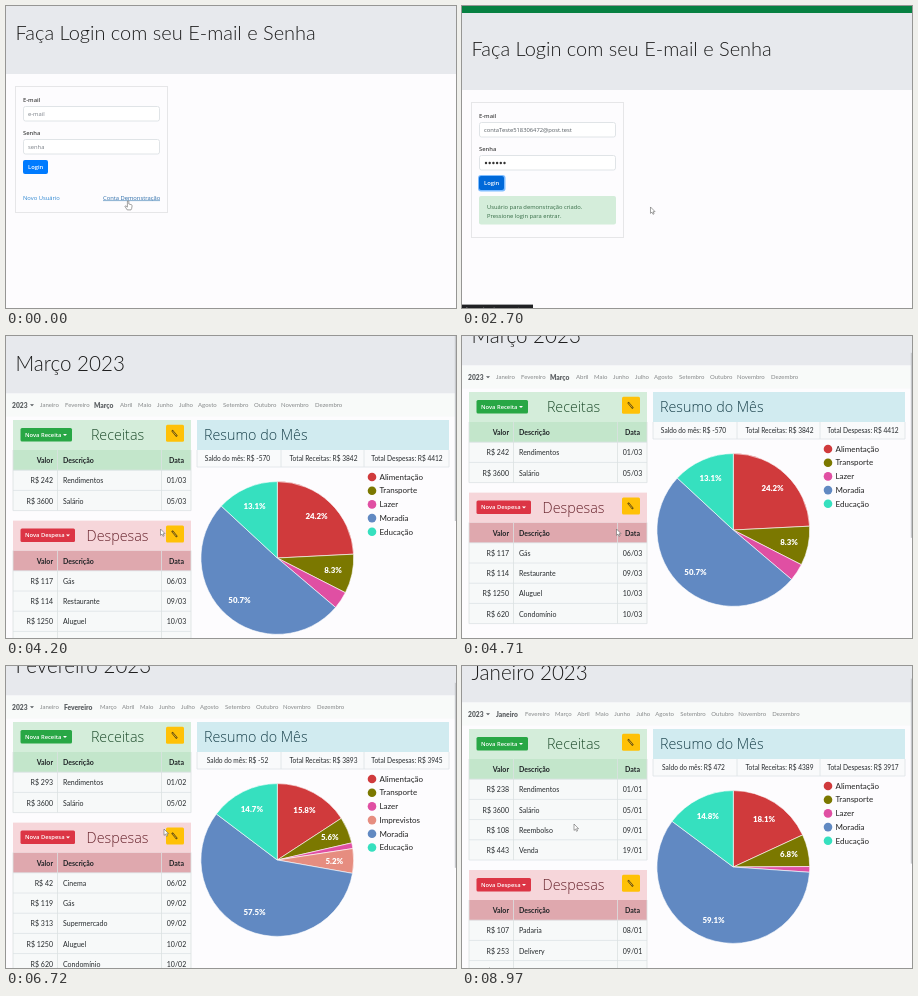
An HTML page that plays this animation: 450 by 302 pixels, repeating every 9000 ms.

```html
<!DOCTYPE html>
<html lang="pt-BR">
<head>
<meta charset="utf-8">
<title>Controle de despesas</title>
<style>
  html, body { margin: 0; width: 100%; height: 100%; overflow: hidden; background: #fdfcfe; }
  svg { display: block; width: 450px; height: 302px; }
  text { white-space: pre; }
  .title { font: 300 20.6px Lato, sans-serif; fill: #1c1c1c; }
  .welcome { font: 300 20px Lato, sans-serif; fill: #1c1c1c; }
  .head { font: 300 14.3px "Open Sans", sans-serif; }
  .body { font: 400 7px Lato, sans-serif; fill: #262a2d; }
  .bold { font: 700 7px Lato, sans-serif; fill: #1f2326; }
  .sum { font: 400 6.6px Lato, sans-serif; fill: #262a2d; }
  .tab { font: 400 6px Lato, sans-serif; fill: #858889; }
  .on { font: 900 6.7px Lato, sans-serif; fill: #5d6164; }
  .legend { font: 400 8px Lato, sans-serif; fill: #222; }
  .share { font: 900 7.9px Lato, sans-serif; fill: #fff; }
  .ui { font-family: "Open Sans", sans-serif; font-size: 5.8px; }
</style>
</head>
<body>
<svg id="stage" viewBox="0 0 450 302"></svg>
<script>
const LOOP = 9000, ROW = 20.2;

const rect = (x, y, w, h, fill, more = '') =>
  `<rect x="${x}" y="${y}" width="${w}" height="${h}" fill="${fill}" ${more}/>`;
const text = (x, y, cls, str, more = '') => `<text x="${x}" y="${y}" class="${cls}" ${more}>${str}</text>`;
const line = (x1, y1, x2, y2, color = '#dee2e6') =>
  `<path d="M${x1} ${y1}L${x2} ${y2}" stroke="${color}" stroke-width=".8"/>`;
const ui = (x, y, str, fill, more = '') => text(x, y, 'ui', str, `fill="${fill}" ${more}`);
const caret = (x, y, fill) => `<path d="M${x} ${y}h4l-2 2z" fill="${fill}"/>`;
const END = 'text-anchor="end"', MID = 'text-anchor="middle"', SEMI = 'font-weight="600"';

// Login page

const field = (y, label) => ui(17, y - 4.5, label, '#444', SEMI) +
  rect(17.5, y + .5, 136, 14.5, '#fff', 'rx="2" stroke="#dde1e5" stroke-width=".9"');

function loginPage() {
  const dots = [0, 1, 2, 3, 4, 5].map(i => `<circle cx="${24 + i * 3.7}" cy="141" r="1.2" fill="#333"/>`).join('');
  return rect(0, -40, 450, 31, '#078142') + rect(0, -9, 450, 77, '#e7e9ed') +
    text(9.5, 34, 'welcome', 'Faça Login com seu E-mail e Senha') +
    `<rect id="card" x="9.5" y="80.5" width="152" height="126" fill="none" stroke="#e6e6e8"/>` +
    field(100, 'E-mail') + field(133, 'Senha') +
    `<rect id="ring" x="16" y="153" width="27.5" height="16.5" rx="3" fill="#80bdff"/>` +
    `<rect id="enter" x="17" y="154" width="25" height="14" rx="2"/>` + ui(22, 163.4, 'Login', '#fff', SEMI) +
    `<g id="blank">${ui(22, 110, 'e-mail', '#7b8188') + ui(22, 143, 'senha', '#7b8188') +
      ui(17, 193.7, 'Novo Usuário', '#2d87d2') +
      ui(97, 193.7, 'Conta Demonstração', '#2b6ca9') + line(97, 194.6, 154, 194.6, '#6d9cc6')}</g>` +
    `<g id="filled">${ui(22, 110, 'contaTeste518306472@post.test', '#555c62') + dots +
      rect(17, 174, 137, 28.5, '#d4edda', 'rx="2"') +
      ui(25, 186.5, 'Usuário para demonstração criado.', '#356b45') +
      ui(25, 195.7, 'Pressione login para entrar.', '#356b45')}</g>`;
}

// Month pages

const MONTHS = ['Janeiro', 'Fevereiro', 'Março', 'Abril', 'Maio', 'Junho', 'Julho', 'Agosto',
  'Setembro', 'Outubro', 'Novembro', 'Dezembro'];
const TAB_X = [114, 132, 151, 173, 192, 217, 248, 275, 309];

const SLICE = {
  Alimentação: '#d03a3c', Transporte: '#7b7800', Lazer: '#e04fa3',
  Imprevistos: '#e68d80', Moradia: '#6189c2', Educação: '#36e0bf'
};

const INCOME = { title: 'Receitas', button: 'Nova Receita', w: 52, color: '#28a745', bg: '#d4edda', row: '#c3e6cb', ink: '#1c4a2a' };
const SPEND = { title: 'Despesas', button: 'Nova Despesa', w: 55, color: '#dc3545', bg: '#f6d6da', row: '#dfa8ae', ink: '#66222b' };

const PAGES = [
  { index: 0, tabs: [34, 63, 93], shift: 1.3, totals: [472, 4389, 3917],
    income: [[238, 'Rendimentos', '01/01'], [3600, 'Salário', '05/01'], [108, 'Reembolso', '09/01'], [443, 'Venda', '19/01']],
    spend: [[107, 'Padaria', '08/01'], [253, 'Delivery', '09/01'], [1250, 'Aluguel', '10/01']],
    pie: { Alimentação: 18.1, Transporte: 6.8, Lazer: 1.2, Moradia: 59.1, Educação: 14.8 } },
  { index: 1, tabs: [34, 58, 94], shift: 2, totals: [-52, 3893, 3945],
    income: [[293, 'Rendimentos', '01/02'], [3600, 'Salário', '05/02']],
    spend: [[42, 'Cinema', '06/02'], [119, 'Gás', '09/02'], [313, 'Supermercado', '09/02'],
      [1250, 'Aluguel', '10/02'], [620, 'Condomínio', '10/02']],
    pie: { Alimentação: 15.8, Transporte: 5.6, Lazer: 1.2, Imprevistos: 5.2, Moradia: 57.5, Educação: 14.7 } },
  { index: 2, tabs: [34, 59, 88], shift: 0, totals: [-570, 3842, 4412],
    income: [[242, 'Rendimentos', '01/03'], [3600, 'Salário', '05/03']],
    spend: [[117, 'Gás', '06/03'], [114, 'Restaurante', '09/03'], [1250, 'Aluguel', '10/03'], [620, 'Condomínio', '10/03']],
    pie: { Alimentação: 24.2, Transporte: 8.3, Lazer: 3.7, Moradia: 50.7, Educação: 13.1 } }
];

function pageHead(page) {
  const tabs = MONTHS.map((name, i) => text(i < 3 ? page.tabs[i] : TAB_X[i - 3] + page.shift,
    i === page.index ? 72.4 : 71.3, i === page.index ? 'on' : 'tab', name)).join('');
  return rect(0, 0, 450, 57.5, '#e7e9ed') + rect(0, 57.5, 450, 23, '#f8faf9') +
    text(9.5, 34.6, 'title', MONTHS[page.index] + ' 2023') +
    text(6, 71.5, 'on', '2023') + caret(24, 68.2, '#55595c') + tabs;
}

const pencilButton = (x, y) => rect(x, y, 18, 17, '#ffc107', 'rx="1.5"') +
  `<path d="M${x + 6} ${y + 5.5}l5 6" stroke="#57430d" stroke-width="2"/>` +
  `<path d="M${x + 6.6} ${y + 6.3}l3.8 4.5" stroke="#e9b520" stroke-width=".9"/>`;

const newButton = (kind, y) => rect(14.5, y + 8, kind.w - .5, 13.5, kind.color, 'rx="1.5"') +
  ui(19, y + 16.8, kind.button, '#fff', SEMI) + caret(kind.w + 5, y + 14, '#fff');

function emptyTable(kind, y, pencilX) {
  const lines = [53.5, 127, 171].map(x => line(x, y + 31, x, y + 51.5, '#fff8')).join('');
  return rect(7, y, 181, 31, kind.bg) + rect(7, y + 31, 181, 20.5, kind.row) + newButton(kind, y) +
    text(68, y + 20.5, 'head', kind.title, `fill="${kind.ink}"`) + pencilButton(pencilX, y + 5) +
    rect(pencilX + 19, y + 5, 33, 21, '#6c757d', 'rx="1.5"') +
    ui(pencilX + 35.5, y + 17.5, 'Cancelar', '#fff', MID) + lines +
    text(49, y + 44, 'bold', 'Valor', END) + text(58, y + 44, 'bold', 'Descrição') + text(141, y + 44, 'bold', 'Data');
}

function fullTable(kind, y, rows) {
  const top = y + 30, bottom = top + ROW * (rows.length + 1);
  const cells = rows.map(([value, name, date], i) => {
    const rowY = top + ROW * (i + 1), base = rowY + 13.2;
    return line(7, rowY, 185, rowY) + text(47, base, 'body', 'R$ ' + value, END) +
      text(57, base, 'body', name) + text(170.5, base, 'body', date, MID);
  }).join('');
  return rect(7, y, 178, 30, kind.bg) + rect(7, top, 178, bottom - top, '#f7f9f9') +
    rect(7, top, 178, ROW, kind.row) + newButton(kind, y) +
    text(111.5, y + 20.3, 'head', kind.title, `fill="${kind.ink}" ${MID}`) + pencilButton(160, y + 4.8) +
    text(47, top + 12.9, 'bold', 'Valor', END) + text(57, top + 12.9, 'bold', 'Descrição') +
    text(170.5, top + 12.9, 'bold', 'Data', MID) + cells +
    [7, 51.5, 155.5, 185].map(x => line(x, top, x, bottom, '#dbe1e1')).join('') + line(7, bottom, 185, bottom);
}

function pieChart(shares) {
  const cx = 271.3, cy = 222, r = 76.4;
  const at = (share, radius) => {
    const a = share / 100 * 2 * Math.PI;
    return [(cx + radius * Math.sin(a)).toFixed(2), (cy - radius * Math.cos(a)).toFixed(2)];
  };
  let sum = 0, wedges = '', labels = '';
  Object.entries(shares).forEach(([name, share], i) => {
    wedges += `<path d="M${cx} ${cy}L${at(sum, r)}A${r} ${r} 0 ${+(share > 50)} 1 ${at(sum + share, r)}Z"
      fill="${SLICE[name]}" stroke="#fff" stroke-width=".6"/>`;
    const [x, y] = at(sum + share / 2, 57);
    if (share > 5) labels += text(x, +y + 2.8, 'share', share.toFixed(1) + '%', MID);
    const ly = 141 + i * 13.7;
    labels += `<circle cx="366" cy="${ly}" r="4.3" fill="${SLICE[name]}"/>` + text(373.5, ly + 2.7, 'legend', name);
    sum += share;
  });
  return wedges + labels;
}

function summary(page) {
  const names = ['Saldo do mês', 'Total Receitas', 'Total Despesas'];
  return rect(191, 84, 252, 30, '#d1ebf0') +
    text(198, 104.2, 'head', 'Resumo do Mês', 'fill="#173f49"') + rect(191, 114, 252, 17, '#f9fafb') +
    names.map((name, i) => text([231.5, 317.5, 401][i], 124.5, 'sum', `${name}: R$ ${page.totals[i]}`, MID)).join('') +
    [191, 275, 358, 443].map(x => line(x, 114, x, 131)).join('') + line(191, 131, 443, 131) + pieChart(page.pie);
}

const loadingPage = page => pageHead(page) + emptyTable(INCOME, 84, 128) + emptyTable(SPEND, 145, 135);
const loadedPage = page => pageHead(page) + fullTable(INCOME, 84, page.income) +
  fullTable(SPEND, 124 + ROW * (page.income.length + 1), page.spend) + summary(page);

// Timeline: each scene holds until the next begins

const SCENES = [
  { start: 0, id: 'login', html: loginPage(), scroll: [[1050, 0], [1260, -16]] },
  { start: 2910, id: 'mar-wait', html: loadingPage(PAGES[2]) },
  { start: 3870, id: 'mar', html: loadedPage(PAGES[2]), scroll: [[4290, 0], [4710, 28]] },
  { start: 5790, id: 'fev-wait', html: loadingPage(PAGES[1]) },
  { start: 6420, id: 'fev', html: loadedPage(PAGES[1]), scroll: [[6480, 0], [6690, 28]] },
  { start: 7680, id: 'jan-wait', html: loadingPage(PAGES[0]) },
  { start: 8640, id: 'jan', html: loadedPage(PAGES[0]), scroll: [[8700, 0], [8970, 21]] }
];

const POINTER = [
  [150, 122, 195], [330, 207, 203], [1050, 207, 203], [1260, 32, 163], [1440, 32, 180],
  [2370, 188.5, 201], [2700, 188.5, 201], [3180, 154.5, 193], [4860, 154.5, 193], [5400, 70, 41],
  [5700, 70, 41], [5880, 156, 125], [6300, 156, 125], [6690, 158, 163], [6750, 158, 163],
  [7320, 42, 41], [7650, 42, 41], [8100, 113, 113], [8640, 113, 113], [8970, 112, 158]
];

function follow(keys, t) {
  const next = keys.findIndex(key => key[0] > t);
  if (next < 1) return (next ? keys[keys.length - 1] : keys[0]).slice(1);
  const a = keys[next - 1], b = keys[next];
  const p = (t - a[0]) / (b[0] - a[0]), k = p * p * (3 - 2 * p);
  return a.slice(1).map((v, i) => v + (b[i + 1] - v) * k);
}

const stage = document.getElementById('stage');
stage.innerHTML = rect(0, 0, 450, 302, '#fdfcfe') +
  SCENES.map(s => `<g id="${s.id}">${s.html}</g>`).join('') +
  rect(448.8, 0, 1.2, 185, '#c6c8cb', 'id="bar"') +
  `<g id="status">${rect(0, 298.6, 120, 4, '#202124', 'id="statusBox"')}
    ${ui(3, 304.5, 'Aguardando resposta', '#9a9a9a')}</g>
  <g id="pointer" fill="#fff" stroke="#666" stroke-width=".6" stroke-linejoin="round">
    <path id="arrow" d="M0 0v6.4l1.5-1.3 1 2.2 1.1-.5-1-2.1h2z"/>
    <path id="hand" d="M-.6 0q.8-.8 1.4 0v3l2.6.7q.8.3.7 1.2l-.5 2.8-.6 1.2h-3.8l-2.2-3.4q.1-1 1.1-.4l1.3 1z"/>
  </g>`;

const el = id => document.getElementById(id);
const show = (id, on) => el(id).setAttribute('display', on ? 'inline' : 'none');
const within = (t, from, to) => t >= from && t < to;

function render(t) {
  const current = SCENES.filter(s => s.start <= t).pop();
  SCENES.forEach(s => show(s.id, s === current));
  const scroll = current.scroll ? follow(current.scroll, t)[0] : 0;
  el(current.id).setAttribute('transform', `translate(0 ${-scroll})`);

  const filled = t >= 510, waiting = current.id.endsWith('-wait');
  show('blank', !filled);
  show('filled', filled);
  el('card').setAttribute('height', filled ? 135 : 126);
  show('ring', filled);
  el('enter').setAttribute('fill', filled ? '#0069d9' : '#007bff');

  show('bar', t >= 3870 && !waiting);
  el('bar').setAttribute('y', scroll * .6);
  show('status', waiting || within(t, 60, 1050) || within(t, 2700, 2910));
  el('statusBox').setAttribute('width', waiting ? 120 : 71);

  const hand = t < 150 || within(t, 5370, 5700) || within(t, 7290, 7650);
  show('hand', hand);
  show('arrow', !hand);
  el('pointer').setAttribute('transform', `translate(${follow(POINTER, t)})`);
}

const begin = performance.now();
function tick() {
  render((performance.now() - begin) % LOOP);
  requestAnimationFrame(tick);
}
render(0);
requestAnimationFrame(tick);
</script>
</body>
</html>
```
